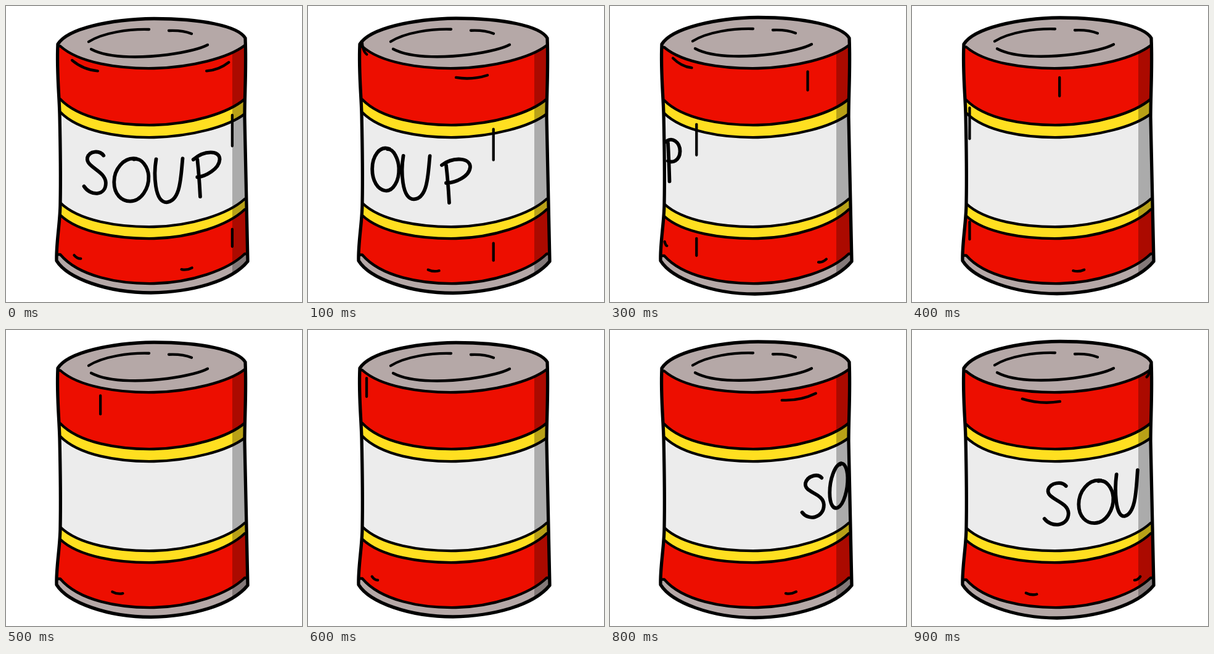
Animation, 480 px wide and 480 px high, one loop 1000 ms. Source, as an HTML page:

```html
<!DOCTYPE html>
<html lang="en">
<head>
<meta charset="utf-8">
<title>Spinning soup can</title>
<style>
  html, body { margin: 0; width: 100%; height: 100%; overflow: hidden; background: #fff; }
  svg { display: block; width: 100vw; height: 100vh; }
  path { fill: none; stroke: #000; stroke-width: 4.3; stroke-linecap: round; stroke-linejoin: round; vector-effect: non-scaling-stroke; }
  .edge { stroke-width: 5.3; }
  .letter { stroke-width: 5.8; }
  .pose { visibility: hidden; animation: show 1s step-end infinite; }
  @keyframes show {
    0% { visibility: visible; }
    10%, 100% { visibility: hidden; }
  }
</style>
</head>
<body>
<svg id="stage" viewBox="0 0 480 480" role="img" aria-label="Soup can"></svg>
<script>
const STEPS = 10;
const CENTRE = 237, RADIUS = 150, BOW = 56;
const GREY = '#b5a8a7', RED = '#ed0e00', YELLOW = '#ffdf20', LABEL = '#ececec';

// Colour above each seam, then its left, middle and right height.
const seams = [
  [RED, 403, 450, 402],
  [YELLOW, 339, 377, 330],
  [LABEL, 319, 358, 313],
  [YELLOW, 172, 213, 175],
  [RED, 151, 193, 151],
  [GREY, 65, 101, 64]
];

const lidMarks = 'M134 58C158 43 200 37 232 38M264 40Q286 39 301 45M138 70C170 87 230 83 262 79C290 75 314 70 327 63';

// Letters by their angle on the can at the start of the loop.
const letters = [
  [-38, 'M15-30C8-38-10-36-14-24C-17-8 18-6 19 14C19 36-9 38-20 23'],
  [-13, 'M8-34C-13-37-28-16-28 4C-28 24-16 35-2 35C16 35 29 14 28-6C27-20 17-36 4-33'],
  [9, 'M-17-34C-21-10-20 36 0 36C23 34 23-6 26-35'],
  [36, 'M-16-25Q-13 0-11 36M-23-25C-4-39 23-37 23-22C22-6-2 4-16 4']
];

// Scratches: start angle, height, then length of a tick or half angle of an arc.
const ticks = [[60, 174, 50], [60, 348, 28], [134, 75, 30]];
const arcs = [[-48, 62, 12], [46, 62, 10], [-54, 376, 3.5], [22, 376, 3.5], [146, 376, 3.5]];

const rad = deg => deg * Math.PI / 180;
const path = (d, attrs = '') => `<path d="${d}" ${attrs}/>`;

// Angle after some steps, between -180 and 180; the spin eases a little.
function turn(angle, step) {
  const now = angle - 360 * step / STEPS + 12 * Math.sin(Math.PI * step / STEPS) ** 2;
  return (now + 900) % 360 - 180;
}

const around = angle => CENTRE + RADIUS * Math.sin(rad(angle));
const down = (height, angle) => height + BOW * Math.cos(rad(angle));

function silhouette(w) {
  const top = 20.5 - w, foot = 465 + w;
  return `M84 62C100 36 170 ${top + 1} 240 ${top}C315 ${top} 376 32 388 52` +
    `C390 100 387 140 387 180C388 260 391 340 392 414` +
    `C365 447 300 ${foot - 1} 235 ${foot}C165 ${foot} 100 442 82 413` +
    `C81 385 88 350 88 320C89 270 88 220 87 175C86 140 82 105 84 62Z`;
}

// Everything above one seam, so that seams can be stacked from the foot up.
function above([fill, l, m, r], w) {
  const left = l + w;
  return path(`M0 ${left}H88C118 ${left + (m - left) * .76} 183 ${m + 1} 240 ${m}` +
    `C300 ${m - 1.5} 360 ${r + (m - r) * .55} 387 ${r}H480V0H0Z`, `style="fill:${fill}"`);
}

function drawCan(w, id) {
  const edge = silhouette(w);
  const parts = seams.map(seam => above(seam, w));
  const lid = parts.pop();
  return `<clipPath id="${id}"><path d="${edge}"/></clipPath>
    <g clip-path="url(#${id})">
      <rect width="480" height="480" fill="${GREY}"/>${parts.join('')}
      <rect x="367" width="40" height="480" opacity=".28"/>${lid}
    </g>` + path(edge, 'class="edge"') + path(lidMarks, `transform="translate(0 ${-w / 2})"`);
}

function drawLetter([start, shape], step) {
  const angle = turn(start, step);
  if (Math.abs(angle) > 70) return '';
  const width = Math.min(1, 1.15 * Math.cos(rad(angle)));
  const slope = -.37 * Math.sin(rad(angle)) ** 3;
  return path(shape, `class="letter" transform="matrix(${width} ${slope} 0 1 ${around(angle)} ${down(227, angle)})"`);
}

function drawTick([start, height, length], step) {
  const angle = turn(start, step);
  if (Math.abs(angle) > 84) return '';
  return path(`M${around(angle)} ${down(height, angle) - length / 2}v${length}`);
}

function drawArc([start, height, half], step) {
  const angle = turn(start, step);
  if (Math.abs(angle) > 84) return '';
  const point = (a, sag) => `${around(a)} ${down(height, a) + sag}`;
  return path(`M${point(angle - half, -2)}Q${point(angle, half / 3)} ${point(angle + half, -2)}`);
}

function drawPose(step) {
  const id = 'can' + step;
  const w = 1 - Math.cos(Math.PI * step / 3);
  const draw = (list, fn) => list.map(item => fn(item, step)).join('');
  return `<g class="pose" style="animation-delay:${(step - STEPS) * 1000 / STEPS}ms">
    ${drawCan(w, id)}
    <g clip-path="url(#${id})">${draw(letters, drawLetter)}${draw(ticks, drawTick)}${draw(arcs, drawArc)}</g>
  </g>`;
}

document.getElementById('stage').innerHTML =
  Array.from({ length: STEPS }, (_, step) => drawPose(step)).join('');
</script>
</body>
</html>
```
